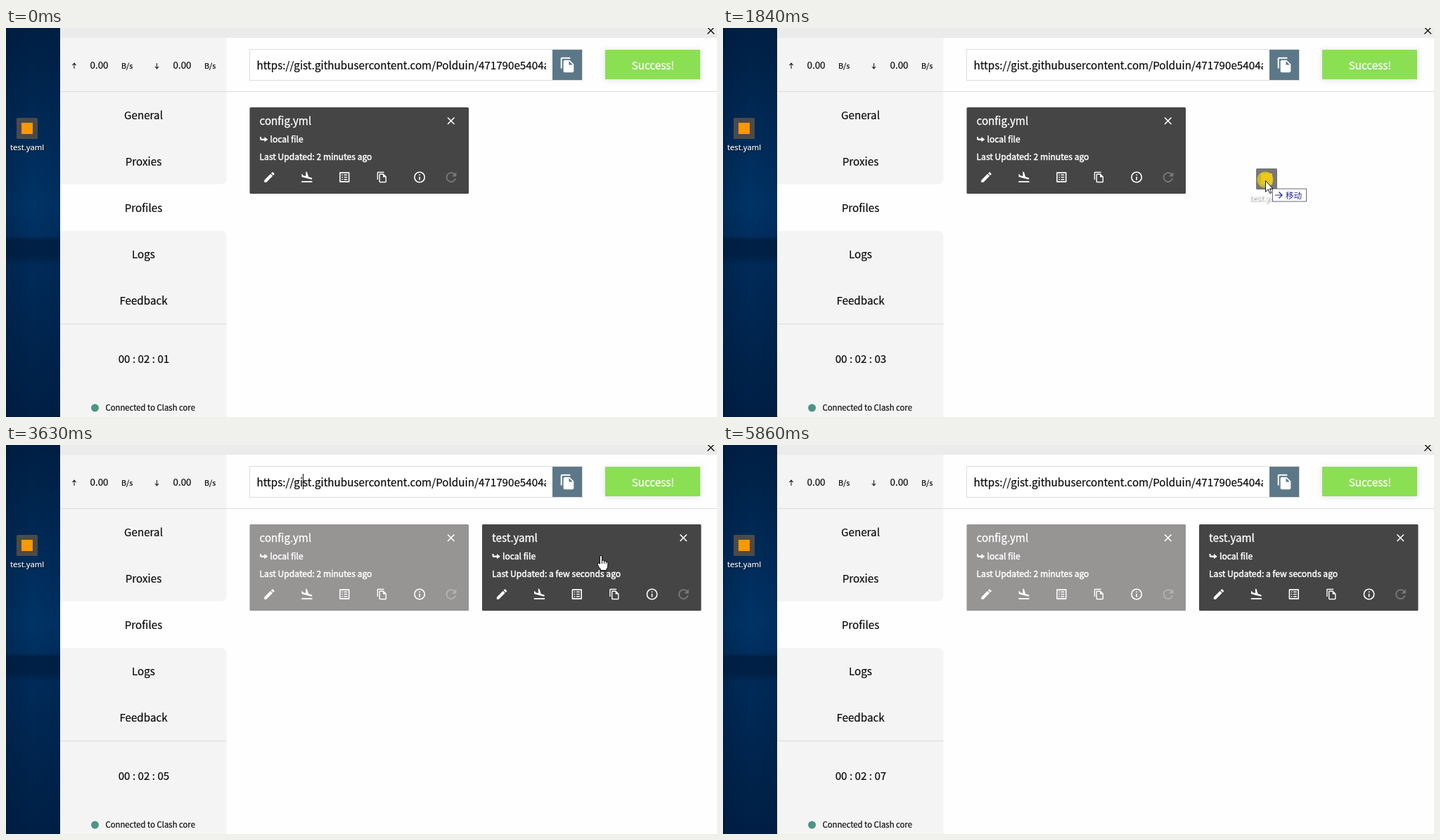
An HTML page that plays this animation: 1011x554 px, repeating every 6090 ms.

```html
<!DOCTYPE html>
<html lang="en">
<head>
<meta charset="utf-8">
<title>Profile manager</title>
<style>
  html, body { margin: 0; width: 100%; height: 100%; overflow: hidden; background: #fefefe; }
  #stage { display: block; width: 100vw; height: 100vh; }
  text { font: 15.2px "Noto Sans CJK SC", "Noto Sans CJK JP", sans-serif; fill: #0a0a0a; stroke: #0a0a0a; stroke-width: .2px; white-space: pre; }
  .mid { text-anchor: middle; }
  .number { font-size: 13.4px; }
  .unit { font-size: 10.8px; }
  .status { font-size: 11.3px; }
  .desktop { font: 11.2px "Noto Sans", "Open Sans", sans-serif; fill: #fff; stroke: none; }
  .card text, .light { fill: #fff; stroke: #fff; stroke-width: .3px; }
  .card .small { font-size: 12.1px; stroke-width: .45px; }
  .hint { font-size: 11.6px; fill: #24249c; stroke: none; }
</style>
</head>
<body>
<svg id="stage" viewBox="0 0 1011 554">
  <defs>
    <linearGradient id="night" x2="0" y2="1">
      <stop offset="0" stop-color="#001f44"/>
      <stop offset=".2" stop-color="#002853"/>
      <stop offset=".46" stop-color="#003467"/>
      <stop offset=".535" stop-color="#002f60"/>
      <stop offset=".545" stop-color="#002145"/>
      <stop offset=".585" stop-color="#002146"/>
      <stop offset=".61" stop-color="#002b59"/>
      <stop offset="1" stop-color="#001f45"/>
    </linearGradient>
    <linearGradient id="shade">
      <stop offset="0" stop-color="#001530" stop-opacity=".25"/>
      <stop offset=".5" stop-color="#001530" stop-opacity="0"/>
      <stop offset="1" stop-color="#001530" stop-opacity=".15"/>
    </linearGradient>
    <filter id="glow" x="-20%" y="-40%" width="140%" height="180%">
      <feDropShadow dx="0" dy="1" stdDeviation="4" flood-color="#000" flood-opacity=".12"/>
    </filter>
    <filter id="labelShadow" x="-20%" y="-40%" width="140%" height="190%">
      <feDropShadow dx="1" dy="1" stdDeviation=".8" flood-color="#000" flood-opacity=".9"/>
    </filter>
    <!-- Origin is the centre of the tile -->
    <g id="file">
      <rect x="-15" y="-15" width="30" height="30" rx="1.5" fill="#4c4a49"/>
      <rect x="-8" y="-8" width="16" height="16" fill="#ff9800"/>
      <text class="desktop mid" y="30.5" filter="url(#labelShadow)">test.yaml</text>
    </g>
  </defs>

  <rect width="77" height="554" fill="url(#night)"/>
  <rect width="77" height="554" fill="url(#shade)"/>
  <use href="#file" x="30" y="143"/>
  <rect id="selection" x="-.5" y="127.5" width="64.5" height="51" fill="#78b4e6" fill-opacity=".3" stroke="#8fc0e8" stroke-opacity=".55"/>

  <rect x="77" width="934" height="554" fill="#fefefe"/>
  <rect x="77" width="934" height="14" fill="#ebebeb"/>
  <path d="M997.500 -1l9.500 9.500m0-9.500l-9.500 9.500" stroke="#111" stroke-width="1.4"/>
  <path d="M77 14H313.5V214q0 8.5-8.5 8.5H77zM77 289H305q8.5 0 8.5 8.5V554H77z" fill="#f4f4f4"/>
  <path d="M77 90.5H1011M77 421.5H313.5" stroke="#dcdcdc"/>

  <path d="M97 58V50m-2.6 3.2L97 50l2.6 3.2M214.5 50v8m-2.6-3.2l2.6 3.2 2.6-3.2" fill="none" stroke="#222" stroke-width="1.1"/>
  <text class="number" x="119.5" y="58">0.00</text><text class="unit" x="164" y="58">B/s</text>
  <text class="number" x="237.5" y="58">0.00</text><text class="unit" x="282" y="58">B/s</text>
  <g id="menu"></g>
  <text id="clock" class="mid" x="196" y="477"></text>
  <circle cx="126.5" cy="541" r="5.5" fill="#4d9585"/>
  <text class="status" x="141.5" y="545">Connected to Clash core</text>

  <rect x="346.5" y="30.5" width="473" height="44" fill="#fff" stroke="#dcdcdc"/>
  <svg x="347" y="31" width="421" height="43">
    <text x="9.5" y="28">https://gist.githubusercontent.com/Polduin/471790e5404a</text>
  </svg>
  <path id="caret" d="M422.5 41V63" stroke="#000"/>
  <rect x="777" y="31" width="42" height="43" fill="#5c7888"/>
  <g id="copyButton"></g>
  <rect x="852" y="31" width="135" height="42" fill="#8bdf53" filter="url(#glow)"/>
  <text class="light mid" x="920" y="59">Success!</text>

  <g id="cards"></g>

  <g id="cursor">
    <g id="drag">
      <use href="#file" x="2" y="-2" opacity=".75"/>
      <rect x="10.5" y="12" width="48" height="18" fill="#fff" stroke="#666a80"/>
      <path d="M14 21h10m-4.5-4.5L24 21l-4.5 4.5" fill="none" stroke="#24249c" stroke-width="1.2"/>
      <text class="hint" x="29" y="25.5">移动</text>
    </g>
    <circle id="press" cy="-1" r="11.5" fill="#e6d010" opacity=".75"/>
    <path id="arrow" d="M.5 .5V16.3L4.2 12.9 6.7 18.5 8.9 17.6 6.5 12H11z" fill="#fff" stroke="#111"/>
    <path id="hand" d="M-1.5 12V2Q-1.5 .5 0 .5T1.5 2V7.5Q4 6.5 4.5 8.3 7 7.5 7.3 9.3 9.8 8.7 9.8 11V15Q9.8 18 8 19.5V21.5H-.5V20Q-2.5 18-4.5 14-5.5 11.5-4 11-2.8 10.7-1.5 12.5M1.5 7.5V12M4.5 8.3V12M7.3 9.3V12" fill="#fff" stroke="#111"/>
  </g>
</svg>
<script>
const LOOP = 6090;
const $ = id => document.getElementById(id);
const show = (id, on) => $(id).setAttribute('visibility', on ? 'visible' : 'hidden');

// Icons on a 24-unit grid
const icons = {
  edit: 'M3 17.25V21h3.75L17.81 9.94l-3.75-3.75zM20.71 7.04a1 1 0 0 0 0-1.41l-2.34-2.34a1 1 0 0 0-1.41 0l-1.83 1.83 3.75 3.75z',
  land: 'M2.5 19h19v2h-19zM9.68 13.27l9.66 2.58c.8.21 1.62-.26 1.84-1.06.21-.8-.26-1.62-1.06-1.84l-5.31-1.42-2.76-9.02L10.12 2v8.28L5.15 8.95l-.93-2.32-1.45-.39v5.17z',
  list: 'M19 5v14H5V5h14m1.1-2H3.9q-.9 0-.9.9v16.2q0 .9.9.9h16.2q.9 0 .9-.9V3.9q0-.9-.9-.9zM11 7h6v2h-6zm0 4h6v2h-6zm0 4h6v2h-6zM7 7h2v2H7zm0 4h2v2H7zm0 4h2v2H7z',
  copy: 'M16 1H4q-2 0-2 2v14h2V3h12zM15 5H8Q6 5 6 7v14q0 2 2 2h11q2 0 2-2V11zM8 21V7h6v5h5v9z',
  info: 'M11 7h2v2h-2zm0 4h2v6h-2zm1-9a10 10 0 1 0 0 20 10 10 0 1 0 0-20zm0 18a8 8 0 1 1 0-16 8 8 0 1 1 0 16z',
  refresh: 'M17.65 6.35A8 8 0 1 0 19.73 14h-2.08A6 6 0 1 1 16.22 7.78L13 11h7V4z',
  copySolid: 'M16 1H4q-2 0-2 2v14h2V3h12zM15 5l6 6v10q0 2-2 2H8q-2 0-2-2V7q0-2 2-2zm-1 7h5.5L14 6.5z',
};
const icon = (name, x, y, scale = .8, opacity = 1) =>
  `<path d="${icons[name]}" transform="translate(${x} ${y}) scale(${scale}) translate(-12 -12)"
    fill="#fff" fill-rule="evenodd" opacity="${opacity}"/>`;

const tools = [['edit', .8], ['land', .8], ['list', .8], ['copy', .7], ['info', .8]];
const card = (id, x, title, age) => `
  <g id="${id}" class="card" transform="translate(${x} 113)">
    <rect id="${id}Back" x=".5" width="311.5" height="123" rx="1.5"/>
    <text x="14.5" y="25">${title}</text>
    <path d="M282 14.5l9.5 9.500m0-9.500l-9.500 9.500" stroke="#fff" stroke-width="1.6"/>
    <path d="M15 42h2v2.5h4.500V42l4.800 3.700-4.800 3.600V47H17.500Q15 47 15 44.500z" fill="#fff"/>
    <text class="small" x="29.5" y="50">local file</text>
    <text class="small" x="14.5" y="75">Last Updated: ${age}</text>
    ${tools.map(([name, scale], i) => icon(name, 28.5 + 53.4 * i, 99.5, scale)).join('')}
    ${icon('refresh', 287, 99.5, .92, .28)}
  </g>`;

$('menu').innerHTML = ['General', 'Proxies', 'Profiles', 'Logs', 'Feedback']
  .map((label, i) => `<text class="mid" x="195.5" y="${130 + 66 * i}">${label}</text>`).join('');
$('copyButton').innerHTML = icon('copySolid', 798.5, 52.5, .98);
$('cards').innerHTML = card('config', 346, 'config.yml', '2 minutes ago')
  + card('test', 676.5, 'test.yaml', 'a few seconds ago');

// Pointer moves: first step, last step, number of steps, destination
const pointerStart = [473, 330];
const moves = [
  [120, 670, 8, 55, 158],
  [740, 820, 2, 24, 140],
  [1140, 1680, 8, 746, 216],
  [1760, 1840, 2, 771, 217],
  [1990, 2150, 3, 778, 211],
  [2850, 3090, 4, 845, 157],
  [3630, 3920, 5, 851, 160],
  [4090, 4090, 1, 852, 161],
  [4550, 4860, 5, 905, 492],
  [4930, 5160, 4, 929, 556],
];
const ticks = [360, 1360, 2380, 3400, 4390, 5330];
const caretOn = [[3400, 3850], [4320, 4860], [5330, 5860]];
const within = (t, from, to) => t >= from && t < to;

function pointerAt(t) {
  let [x, y] = pointerStart;
  for (const [from, to, steps, endX, endY] of moves) {
    if (t < from) break;
    const interval = (to - from) / (steps - 1) || 1;
    const p = Math.min(steps, 1 + Math.floor((t - from) / interval + 1e-6)) / steps;
    const eased = p * p * (3 - 2 * p);
    x += (endX - x) * eased;
    y += (endY - y) * eased;
  }
  return [Math.round(x), Math.round(y)];
}

function draw(t) {
  const [x, y] = pointerAt(t);
  const visible = within(t, 120, 5200);
  const overCard = t >= 2850 && y < 236;
  const dragging = within(t, 1140, 2150);
  $('cursor').setAttribute('transform', `translate(${x} ${y})`);
  show('arrow', visible && !overCard);
  show('hand', visible && overCard);
  show('drag', dragging);
  show('press', dragging || within(t, 3230, 3320));
  show('selection', within(t, 740, 1290));
  show('caret', caretOn.some(([from, to]) => within(t, from, to)));

  const switched = t >= 3400;
  show('test', t >= 2300);
  $('configBack').setAttribute('fill', switched ? '#979494' : '#454545');
  $('testBack').setAttribute('fill', switched ? '#454545' : '#979494');
  $('clock').textContent = `00 : 02 : 0${1 + ticks.filter(tick => t >= tick).length}`;
}

const began = performance.now();
function frame() {
  draw((performance.now() - began) % LOOP);
  requestAnimationFrame(frame);
}
frame();
</script>
</body>
</html>
```
